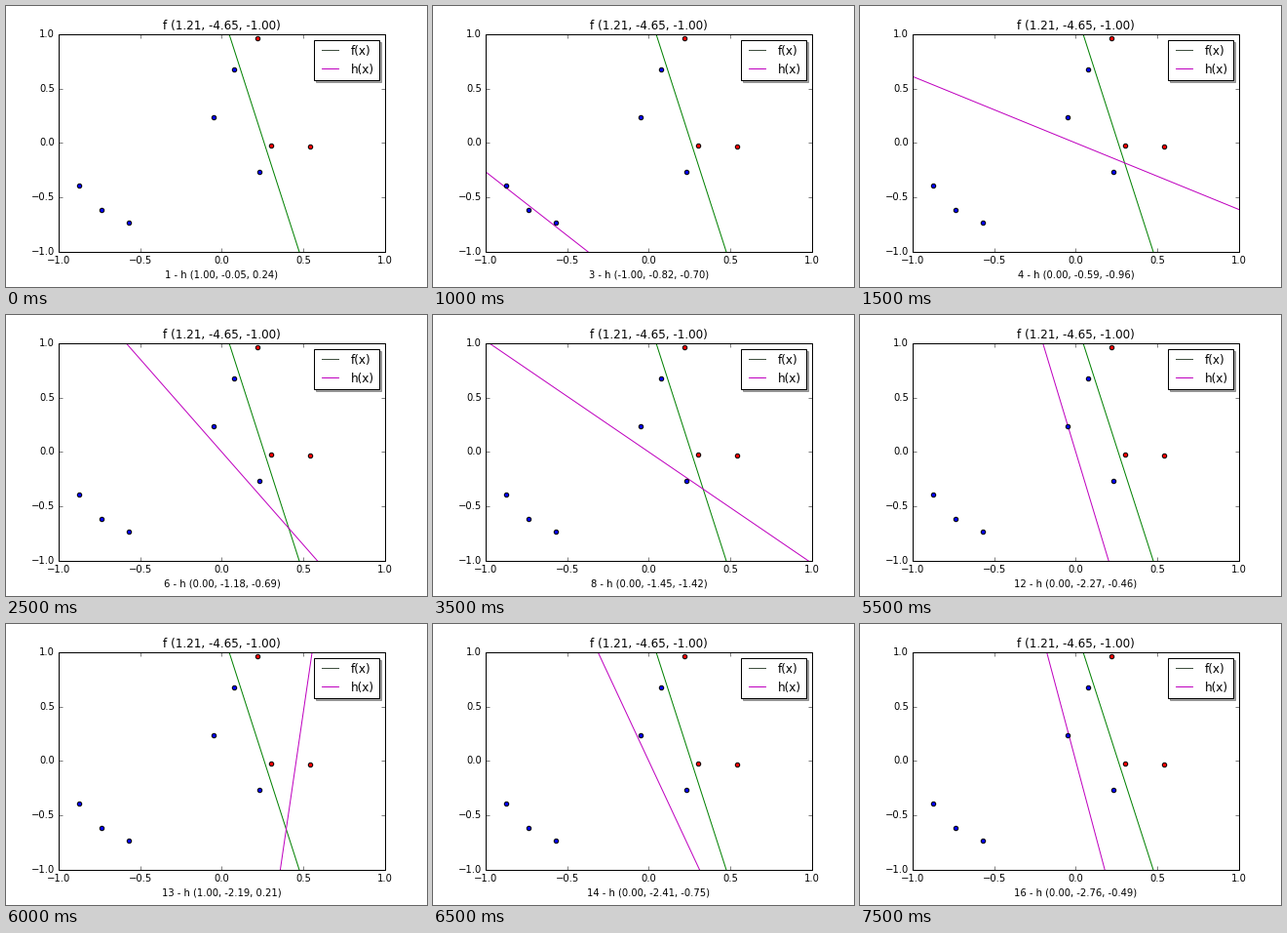
Recreate the animation shown at these times as a matplotlib script. Size 432 by 288 pixels, loop 8000 ms.

```python
import matplotlib.pyplot as plt
import numpy as np
from matplotlib.animation import FuncAnimation

STEPS = 16
INTERVAL = 500

plt.style.use("classic")
plt.rcParams.update({
    "figure.dpi": 72,
    "savefig.dpi": "figure",
    "figure.facecolor": "white",
    "font.family": "DejaVu Sans",
    "font.size": 10,
    "figure.subplot.bottom": 0.125,
})

TARGET = np.array([1.21, -4.65, -1.00])

# Labelled samples: name -> (x, y, class)
POINTS = {
    "A": (-0.872, -0.391, 1),
    "B": (-0.740, -0.619, 1),
    "C": (-0.567, -0.731, 1),
    "D": (-0.050, 0.237, 1),
    "E": (0.0775, 0.672, 1),
    "F": (0.228, -0.265, 1),
    "G": (0.2215, 0.966, -1),
    "H": (0.300, -0.023, -1),
    "I": (0.544, -0.032, -1),
}

# Misclassified sample picked at each perceptron step
PICKS = "DIGFDIDGEHDIEGDH"


def weights(step):
    """Perceptron weights after the given number of updates."""
    w = np.zeros(3)
    for name in PICKS[:step]:
        x, y, label = POINTS[name]
        w += label * np.array([1, x, y])
    return w


def boundary(w):
    """End points of w0 + w1 x + w2 y = 0 across the axes."""
    xs = np.array([-1.0, 1.0])
    return xs, -(w[0] + w[1] * xs) / w[2]


def describe(name, w):
    return f"{name} ({w[0]:.2f}, {w[1]:.2f}, {w[2]:.2f})"


fig, ax = plt.subplots(figsize=(6, 4))
ax.set(xlim=(-1, 1), ylim=(-1, 1))
ax.set_xticks(np.arange(-1, 1.1, 0.5))
ax.set_yticks(np.arange(-1, 1.1, 0.5))
ax.set_title(describe("f", TARGET))

ax.plot(*boundary(TARGET), "g", label="f(x)")
h_line, = ax.plot([], [], "m", label="h(x)")

for label, color in ((1, "b"), (-1, "r")):
    xy = np.array([p[:2] for p in POINTS.values() if p[2] == label])
    ax.scatter(xy[:, 0], xy[:, 1], s=20, c=color, edgecolors="k",
               linewidths=1, zorder=3)

legend = ax.legend(loc="upper right", shadow=True, fontsize=12)
legend.get_lines()[0].set_color("#405040")


def update(i):
    w = weights(i + 1)
    h_line.set_data(*boundary(w))
    ax.set_xlabel(f"{i + 1} - {describe('h', w)}")
    return h_line,


anim = FuncAnimation(fig, update, frames=STEPS, interval=INTERVAL,
                     repeat=True, repeat_delay=0)
plt.show()
```
